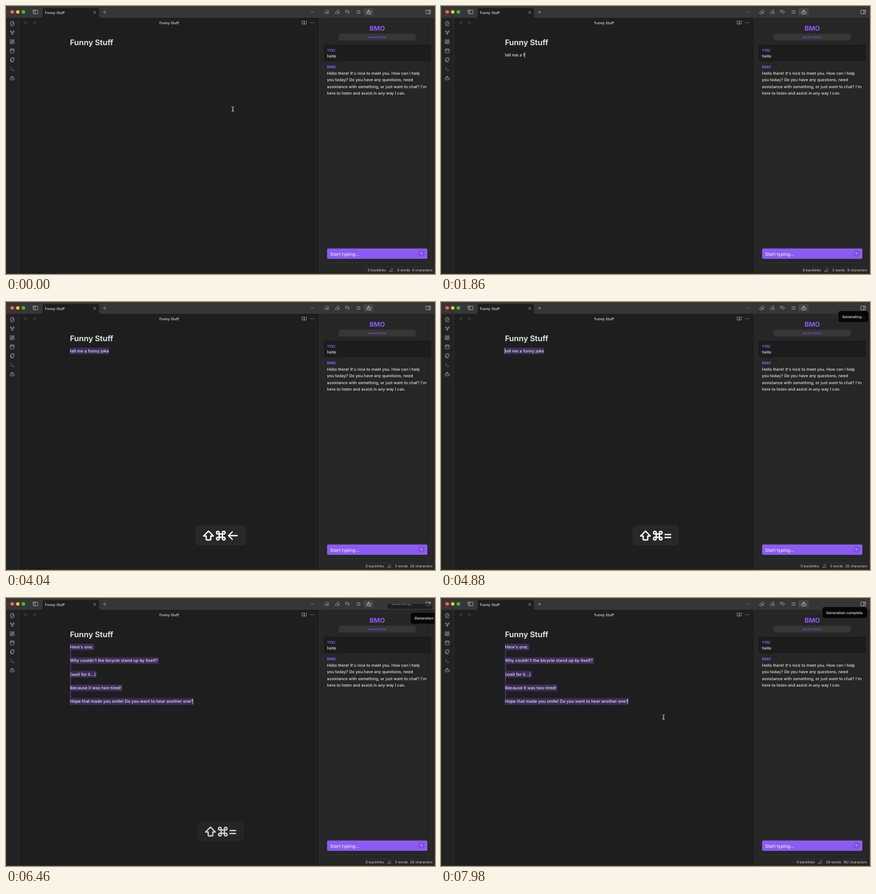
An HTML page for the animation above (8000 ms loop, 800 px wide and 499 px high).

```html
<!DOCTYPE html>
<html lang="en">
<head>
<meta charset="utf-8">
<title>Funny Stuff</title>
<style>
  html, body { margin: 0; width: 100%; height: 100%; overflow: hidden; background: #1e1e1e; }
  svg { display: block; width: 100vw; height: 100vh; }
  text { font-family: Inter, "Open Sans", sans-serif; fill: #dadada; white-space: pre; text-rendering: geometricPrecision; }
  .line { fill: none; stroke-linecap: round; stroke-linejoin: round; }
  .medium { font-weight: 500; fill: #e2e2e2; }
  .bold { font-weight: 700; }
  .accent { fill: #8a5cf5; }
</style>
</head>
<body>
<svg id="stage" viewBox="0 0 800 499" xmlns="http://www.w3.org/2000/svg"></svg>
<script>
const LOOP = 8000;
const PROMPT = "tell me a funny joke";
const KEY_TIMES = [60, 140, 280, 500, 580, 780, 900, 1080, 1160, 1700,
  1860, 1940, 2080, 2260, 2400, 2540, 2620, 2700, 2800, 2880];
const COUNT_TIMES = [340, 640, 900, 1320, 1940, 2400, 2880, 3260];
const JOKE = ["Here's one:", "Why couldn't the bicycle stand up by itself?",
  "(wait for it...)", "Because it was two-tired!",
  "Hope that made you smile! Do you want to hear another one?"];
const SELECT = 3400, RUN = 4680, NOTICE = 4740, DONE = 6380, COUNTED = 6640;
const LEFT = 119.3, ROW = 12.68, NOTE_SIZE = 7.88, CHAT_SIZE = 7.52;

const stage = document.getElementById("stage");

function add(tag, attrs, parent = stage, text) {
  const el = document.createElementNS("http://www.w3.org/2000/svg", tag);
  for (const k in attrs) el.setAttribute(k, attrs[k]);
  if (text !== undefined) el.textContent = text;
  parent.appendChild(el);
  return el;
}
const rect = (x, y, width, height, fill, rx = 0, parent) =>
  add("rect", { x, y, width, height, fill, rx }, parent);
const label = (x, y, size, text, cls = "", parent, more = {}) =>
  add("text", { x, y, "font-size": size, class: cls, ...more }, parent, text);
const group = (parent) => add("g", {}, parent);
const show = (el, on) => el.setAttribute("visibility", on ? "visible" : "hidden");
const move = (el, x, y) => el.setAttribute("transform", `translate(${x} ${y})`);
const clamp = (v) => Math.min(1, Math.max(0, v));
const ease = (v) => { v = clamp(v); return v * v * (3 - 2 * v); };

// Icons on a 24 unit grid
const ring = (x, y, r) => `M${x - r} ${y}a${r} ${r} 0 1 0 ${2 * r} 0a${r} ${r} 0 1 0 ${-2 * r} 0`;
const box = (x, y, w, h) => `M${x} ${y}h${w}v${h}h${-w}z`;
const link = "M10 13a5 5 0 0 0 7.5.5l3-3a5 5 0 0 0-7-7l-1.7 1.7M14 11a5 5 0 0 0-7.5-.5l-3 3a5 5 0 0 0 7 7";
const ICONS = {
  fileIn: "M4 11V4a2 2 0 0 1 2-2h8l6 6v12a2 2 0 0 1-2 2H4M14 2v6h6M2 15h10m-3-3 3 3-3 3",
  graph: ring(12, 18, 3) + ring(6, 6, 3) + ring(18, 6, 3) + "M18 9v1a2 2 0 0 1-2 2H8a2 2 0 0 1-2-2V9M12 12v3",
  board: box(3, 3, 7, 9) + box(14, 3, 7, 5) + box(14, 12, 7, 9) + box(3, 16, 7, 5),
  calendar: "M5 4h14a2 2 0 0 1 2 2v14a2 2 0 0 1-2 2H5a2 2 0 0 1-2-2V6a2 2 0 0 1 2-2zM16 2v4M8 2v4M3 10h18",
  files: "M15.5 2H9a2 2 0 0 0-2 2v12a2 2 0 0 0 2 2h9a2 2 0 0 0 2-2V6.5zM15 2v5h5M4 7v13a2 2 0 0 0 2 2h10",
  terminal: "M4 17l6-6-6-6M12 19h8",
  bot: "M5 10h14a2 2 0 0 1 2 2v7a2 2 0 0 1-2 2H5a2 2 0 0 1-2-2v-7a2 2 0 0 1 2-2zM12 7v3M8 15v1M16 15v1" + ring(12, 5, 2),
  left: "M12 19l-7-7 7-7M19 12H5",
  right: "M12 5l7 7-7 7M5 12h14",
  up: "M5 12l7-7 7 7M12 5v14",
  book: "M2 4h6a4 4 0 0 1 4 4v13a3 3 0 0 0-3-3H2zM22 4h-6a4 4 0 0 0-4 4v13a3 3 0 0 1 3-3h7z",
  dots: ring(4, 12, 1) + ring(12, 12, 1) + ring(20, 12, 1),
  panelL: "M3 4h18a1 1 0 0 1 1 1v14a1 1 0 0 1-1 1H3a1 1 0 0 1-1-1V5a1 1 0 0 1 1-1zM10 4v16M5 8h2M5 12h2",
  panelR: "M3 4h18a1 1 0 0 1 1 1v14a1 1 0 0 1-1 1H3a1 1 0 0 1-1-1V5a1 1 0 0 1 1-1zM14 4v16M17 8h2M17 12h2",
  close: "M6 6l12 12M18 6L6 18",
  plus: "M12 4v16M4 12h16",
  chevron: "M5 9l7 7 7-7",
  linkIn: link + "M22 18h-7m3-3-3 3 3 3",
  linkOut: link + "M15 18h7m-3-3 3 3-3 3",
  tags: "M2 5h7l8 7.500-6.500 6.500L2 12zM13 5l9 8-6 6" + ring(6, 9, .6),
  list: "M8 6h13M8 12h13M8 18h13M3 6h0M3 12h0M3 18h0",
  pencil: "M12 20h9M16.5 3.5l4 4L7 20l-5 1 1-5z"
};
function icon(name, x, y, size = 9.5, color = "#b3b3b3", parent) {
  const s = size / 24;
  return add("path", { d: ICONS[name], class: "line", stroke: color, "stroke-width": 1.9,
    transform: `translate(${x - size / 2} ${y - size / 2}) scale(${s})` }, parent);
}

// Window panes
rect(0, 0, 800, 499, "#1e1e1e");
rect(0, 0, 800, 22, "#363636");
rect(0, 22, 23.5, 477, "#222");
rect(23, 22, .8, 477, "#363636");
rect(585, 22, 215, 477, "#262626");
rect(584.6, 0, .8, 499, "#3a3a3a");
add("path", { d: "M64 22q4 0 4-4V8q0-4 4-4h97.5q4 0 4 4v10q0 4 4 4z", fill: "#1e1e1e" });
["#ff5f57", "#febc2e", "#28c840"].forEach((fill, i) =>
  add("circle", { cx: 11.5 + 10.5 * i, cy: 11, r: 3.3, fill }));

icon("panelL", 55, 11, 10.5);
label(72.8, 14.7, 6.65, "Funny Stuff", "medium");
icon("close", 165.3, 12, 9, "#c4c4c4");
icon("plus", 184, 11.5, 8.5);
icon("chevron", 571.5, 11.5, 8);
rect(667, 4, 18.5, 13.5, "#464646", 2.5);
["linkIn", "linkOut", "tags", "list", "bot"].forEach((n, i) =>
  icon(n, 598 + 19.6 * i, 11, 9.5, i == 4 ? "#dadada" : "#b3b3b3"));
icon("panelR", 787.3, 11, 10.5);

["fileIn", "graph", "board", "calendar", "files", "terminal", "bot"].forEach((n, i) =>
  icon(n, 11.7, 32.8 + 16.85 * i));
icon("left", 37.3, 31, 9, "#5c5c5c");
icon("right", 52.5, 31, 9, "#5c5c5c");
label(304.2, 33.6, 6.65, "Funny Stuff", "medium", stage, { "text-anchor": "middle" });
icon("book", 556.2, 31, 9);
icon("dots", 571, 31, 8.5);
label(119.2, 73.4, 14.5, "Funny Stuff", "bold", stage, { "letter-spacing": "-.006em" });

// Chat panel
add("rect", { x: 591.8, y: 28, width: 201, height: 450, fill: "none", stroke: "#343434", "stroke-width": .7 });
rect(592, 72, 200.7, 31, "#1c1c1c");
label(692.3, 46, 12.2, "BMO", "bold accent", stage, { "text-anchor": "middle" });
rect(620, 51.5, 144, 12.8, "#363636", 2.6);
label(692, 60, 5.75, "llama3:latest", "accent", stage, { "text-anchor": "middle" });
label(598.6, 85, 7, "YOU", "bold accent");
label(598.6, 95.5, CHAT_SIZE, "hello", "medium");
label(598.6, 116, 7, "BMO", "bold accent");
["Hello there! It's nice to meet you. How can I help",
 "you today? Do you have any questions, need",
 "assistance with something, or just want to chat? I'm",
 "here to listen and assist in any way I can."
].forEach((s, i) => label(598.6, 127.7 + 12.55 * i, CHAT_SIZE, s, "medium"));
rect(598.7, 451.6, 187, 19.2, "#8a5cf5", 2.2);
label(604.6, 464.8, 8.3, "Start typing...", "medium", stage, { style: "fill:#f0eaff" });
add("circle", { cx: 774.6, cy: 461.1, r: 6.2, fill: "#7a4de0" });
icon("up", 774.6, 461.1, 7.5, "#e6dcff");

// Status bar
const status = group();
const statusBox = add("path", { fill: "#262626", stroke: "#363636", "stroke-width": .7 }, status);
const backlinks = label(0, 494, 6.35, "0 backlinks", "", status);
const pencil = group(status);
icon("pencil", 0, 491.8, 8, "#b3b3b3", pencil);
const words = label(0, 494, 6.35, "", "", status);
const chars = label(0, 494, 6.35, "", "", status);

function setStatus(text) {
  const w = text.split(/\s+/).filter(Boolean).length, c = text.length;
  const cx = 757.5 - 3.75 * (String(c).length - 1);
  const wx = cx - 28 - 3.95 * (String(w).length - 1);
  const bx = wx - 55;
  words.textContent = w + " words";
  chars.textContent = c + " characters";
  words.setAttribute("x", wx);
  chars.setAttribute("x", cx);
  backlinks.setAttribute("x", bx);
  move(pencil, wx - 10.7, 0);
  statusBox.setAttribute("d", `M${bx - 6.5} 500v-11q0-3 3-3H801v14z`);
}

// Note text
const SELECTED = "#3d2d5b";
const promptSel = rect(118.8, 85, 0, 12.2, SELECTED);
const joke = group();
const prompt = label(LEFT, 94, NOTE_SIZE, PROMPT, "medium");
const promptX = [...PROMPT, ""].map((_, i) => {
  prompt.textContent = PROMPT.slice(0, i);
  return LEFT + (i ? prompt.getComputedTextLength() : 0);
});
promptSel.setAttribute("width", promptX[20] - 118.8);

let jokeEnd = 0;
rect(118.9, 85, 2.8, ROW * 9, SELECTED, 0, joke);
JOKE.forEach((s, i) => {
  const y = 2 * i * ROW, bar = rect(118.9, 85 + y, 0, 12.5, SELECTED, 0, joke);
  jokeEnd = LEFT + label(LEFT, 94 + y, NOTE_SIZE, s, "medium", joke).getComputedTextLength();
  bar.setAttribute("width", jokeEnd - 118.9 + (i < 4 ? 2 : 0));
});
const caret = rect(0, 85.8, .8, 10.6, "#e8e8e8");

// Key display
const loop = "V-5.5A2.5 2.5 0 1 0-5.5-3H-3";
const KEYS = {
  shift: "M0-8.5L9 .7H4.3V6.5Q4.3 8 2.8 8H-2.8Q-4.3 8-4.3 6.5V.7H-9z",
  cmd: "M-3-3" + loop + "M3-3V-5.5A2.5 2.5 0 1 1 5.5-3H3M3 3V5.5A2.5 2.5 0 1 0 5.5 3H3M-3 3V5.5A2.5 2.5 0 1 1-5.5 3H-3M-3-3H3V3H-3z",
  back: "M8 0H-8M-1-7L-8 0L-1 7",
  equal: "M-5.2-2H5.2M-5.2 3.5H5.2"
};
function keyPanel(half, keys) {
  const g = group();
  rect(400.2 - half, 416, 2 * half, 37, "#282828", 7, g);
  keys.forEach(([name, x]) => add("path", { d: KEYS[name], class: "line", stroke: "#fff",
    "stroke-width": 2.4, transform: `translate(${x} 435)` }, g));
  return g;
}
const heldKeys = keyPanel(36, [["shift", 388.5], ["cmd", 411.5]]);
const selectKeys = keyPanel(47, [["shift", 377.6], ["cmd", 400.6], ["back", 423]]);
const runKeys = keyPanel(43.5, [["shift", 381.3], ["cmd", 404.3], ["equal", 423]]);

// Notices
const clip = add("clipPath", { id: "below" });
rect(0, 11, 800, 100, "#000", 0, clip);
const notices = add("g", { "clip-path": "url(#below)" });
function notice(text) {
  const g = group(notices);
  return { g, box: rect(0, 17, 0, 20, "#050505", 4, g),
    text: label(0, 29.6, 6.75, text, "medium", g, { style: "fill:#f2f2f2" }) };
}
function place(n, x) {
  n.box.setAttribute("x", x);
  n.box.setAttribute("width", 794.5 - x);
  n.text.setAttribute("x", x + 7);
}
const first = notice("Generating..."), second = notice("Generation complete.");
place(second, 711.5);

// Text pointer
const pointer = group();
for (const [stroke, width] of [["#111", 2.6], ["#d8d8d8", 1.1]])
  add("path", { d: "M-2.2-4.2Q0-4.2 0-2.8Q0-4.2 2.2-4.2M0-2.8V2.8M-2.2 4.2Q0 4.2 0 2.8Q0 4.2 2.2 4.2M-1.2 .8H1.2",
    class: "line", stroke, "stroke-width": width }, pointer);

// Window edge
add("rect", { x: .4, y: .4, width: 799.2, height: 498.2, rx: 5, fill: "none", stroke: "#4a4a4a", "stroke-width": .8 });

const reached = (times, t) => times.filter((v) => v <= t).length;

function draw(t) {
  const done = t >= DONE;
  const typed = reached(KEY_TIMES, t);
  prompt.textContent = PROMPT.slice(0, typed);
  show(prompt, !done);
  show(promptSel, t >= SELECT && !done);
  show(joke, done);

  const seen = reached(COUNT_TIMES, t);
  setStatus(t >= COUNTED ? JOKE.join("\n\n")
    : seen ? PROMPT.slice(0, reached(KEY_TIMES, COUNT_TIMES[seen - 1] - 100)).trimEnd() : "");

  const blink = (t >= 60 && t < 4040) || (t >= RUN && t < 5320) || (t >= 5940 && t < 7040) || t >= 7660;
  show(caret, blink);
  move(caret, done ? jokeEnd - .4 : t >= SELECT ? 118.5 : promptX[typed], done ? 8 * ROW : 0);

  show(heldKeys, t >= 3080 && t < SELECT);
  show(selectKeys, t >= SELECT && t < RUN);
  show(runKeys, t >= RUN && t < 7350);
  runKeys.setAttribute("opacity", 1 - .92 * ease((t - DONE) / 260));

  const enter = ease((t - NOTICE) / 160), swap = ease((t - DONE) / 160);
  show(first.g, t >= NOTICE && swap < 1);
  place(first, done ? 711.5 : 739);
  move(first.g, 61 * (1 - enter), -33 * swap);
  first.g.setAttribute("opacity", 1 - swap);
  show(second.g, done);
  move(second.g, 88 * (1 - swap), 22 * (1 - swap));

  const glide = ease((t - 7640) / 340);
  show(pointer, t < 60 || t >= 7660);
  move(pointer, 423 - 8 * glide, 192 + 30 * glide);
}

const start = performance.now();
function tick() {
  draw((performance.now() - start) % LOOP);
  requestAnimationFrame(tick);
}
tick();
</script>
</body>
</html>
```
